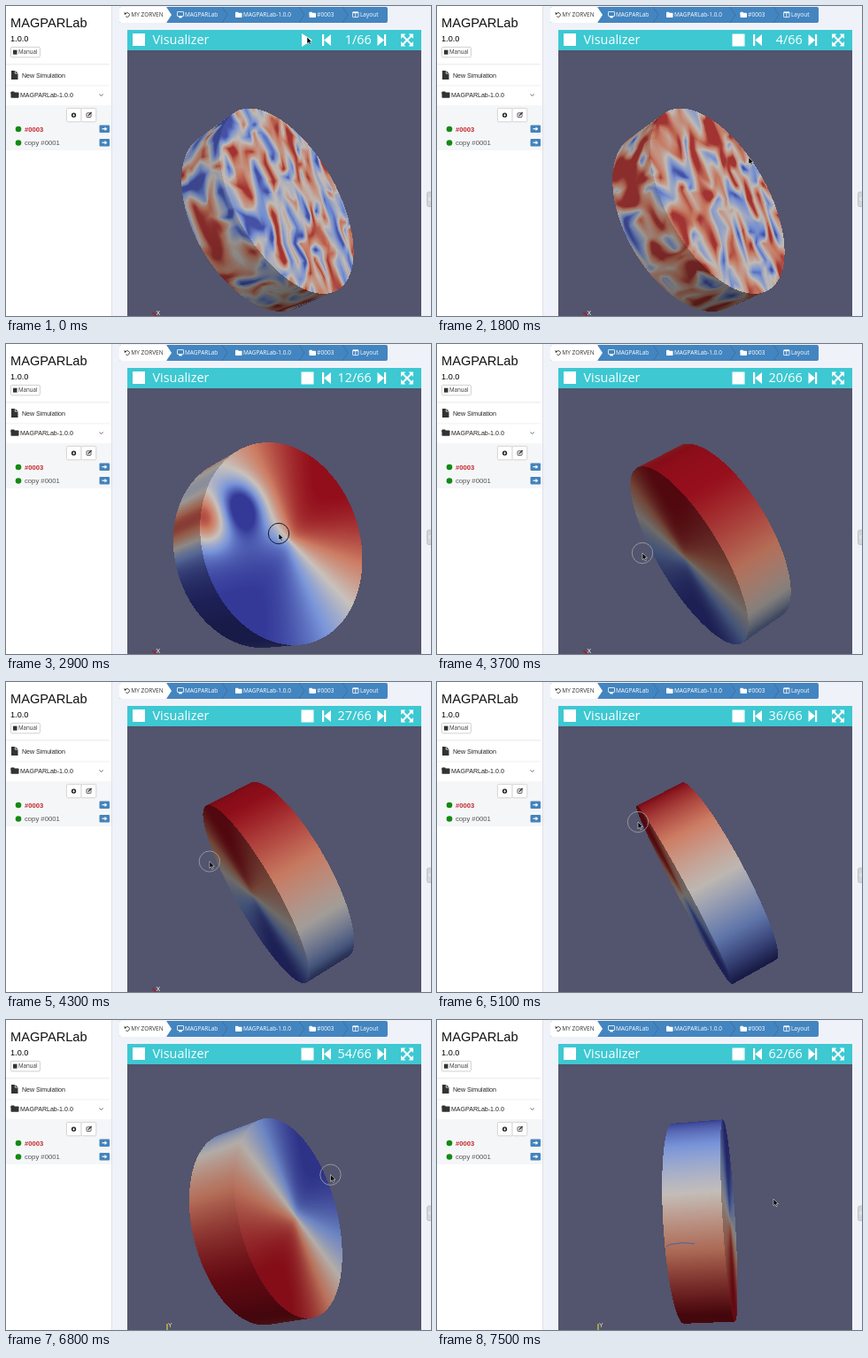
An HTML page with a canvas for the animation above (7600 ms loop, 480x350 px).

```html
<!DOCTYPE html>
<html lang="en">
<head>
<meta charset="utf-8">
<title>Visualizer</title>
<style>
html, body { margin: 0; width: 100%; height: 100%; overflow: hidden; background: #fff; }
canvas { display: block; width: 480px; height: 350px; }
</style>
</head>
<body>
<canvas id="stage" width="480" height="350"></canvas>
<script>
const ctx = document.getElementById('stage').getContext('2d');
const LOOP = 7600, STEP = 100;
const SANS = '"Liberation Sans", Arial, sans-serif';
const OPEN = '"Open Sans", "Noto Sans", sans-serif';
const BACK = [83, 84, 109];

// ---------- helpers ----------
const clamp = (v, a, b) => Math.min(b, Math.max(a, v));
const mix = (a, b, k) => a + (b - a) * k;
const dot = (a, b) => a[0] * b[0] + a[1] * b[1] + a[2] * b[2];
const cross = (a, b) => [a[1] * b[2] - a[2] * b[1], a[2] * b[0] - a[0] * b[2], a[0] * b[1] - a[1] * b[0]];

// keys: [time, value, ...] in order of time, held before the first and after the last
function track(keys, t) {
  let i = 0;
  while (i < keys.length - 2 && keys[i + 1][0] <= t) i++;
  const a = keys[i], b = keys[i + 1];
  const k = clamp((t - a[0]) / (b[0] - a[0]), 0, 1);
  return a.slice(1).map((v, j) => mix(v, b[j + 1], k));
}

function rect(x, y, w, h, fill) {
  ctx.fillStyle = fill;
  ctx.fillRect(x, y, w, h);
}

function box(x, y, w, h, r, fill, stroke) {
  ctx.beginPath();
  ctx.roundRect(x, y, w, h, r);
  if (fill) { ctx.fillStyle = fill; ctx.fill(); }
  if (stroke) { ctx.strokeStyle = stroke; ctx.lineWidth = 0.8; ctx.stroke(); }
}

function poly(points, fill) {
  ctx.beginPath();
  points.forEach(p => ctx.lineTo(...p));
  ctx.closePath();
  ctx.fillStyle = fill;
  ctx.fill();
}

function line(points, color, width) {
  ctx.beginPath();
  points.forEach(p => ctx.lineTo(...p));
  ctx.strokeStyle = color;
  ctx.lineWidth = width;
  ctx.stroke();
}

function arc(x, y, r, from, to, color, width) {
  ctx.beginPath();
  ctx.arc(x, y, r, from, to);
  ctx.strokeStyle = color;
  ctx.lineWidth = width;
  ctx.stroke();
}

// triangle with a vertical side at x and its tip w to the right (or left)
const wedge = (x, y, w, h, fill) => poly([[x, y - h], [x + w, y], [x, y + h]], fill);

function disc(x, y, r, fill) {
  ctx.beginPath();
  ctx.arc(x, y, r, 0, 7);
  ctx.fillStyle = fill;
  ctx.fill();
}

function text(s, x, y, font, fill, align = 'left') {
  ctx.font = font;
  ctx.fillStyle = fill;
  ctx.textAlign = align;
  ctx.fillText(s, x, y);
}

function folder(x, y, w, fill) {
  box(x, y + 1, w, w * 0.7, 0.8, fill);
  box(x, y, w * 0.45, 3, 0.8, fill);
}

// ---------- motion ----------
// time; yaw and pitch of the axis, turn of the field about it, in degrees
const POSE = [
  [2300, 55, 25, 86],
  [2900, 38, 11, 47],
  [3700, -67, -29, 56],
  [5100, -83.5, -28, 93],
  [6100, 0, 34, 162],
  [7100, 84, 3.4, 256]
];
const COUNT = [[1200, 1], [1800, 4], [2900, 12.1], [7500, 62.1]];
const MOUSE = [
  [1200, 340, 35], [1800, 352, 171], [2900, 308, 214], [3700, 232, 236],
  [5100, 227, 158], [6100, 335, 111], [7100, 380, 202]
];
const PLAY_AT = 1100, PRESS_AT = 2400, RELEASE_AT = 7100;

// ---------- field ----------
let seed = 11;
const rnd = () => (seed = (seed * 16807) % 2147483647) / 2147483647;
const lattice = Array.from({ length: 4096 }, () => rnd() * 2 - 1);
const node = (x, y, z) => lattice[(x * 73 + y * 1031 + z * 389) & 4095];

function noise(x, y, z) {
  const i = Math.floor(x), j = Math.floor(y), k = Math.floor(z);
  const row = (j, k) => mix(node(i, j, k), node(i + 1, j, k), x - i);
  const layer = k => mix(row(j, k), row(j + 1, k), y - j);
  return mix(layer(k), layer(k + 1), z - k);
}

const bump = (a, b, a0, b0, s) => Math.exp(-((a - a0) ** 2 + (b - b0) ** 2) / s);

// random domains that order into a vortex; a, b across the face, c along the axis, in radii
function field(a, b, c, step) {
  const order = clamp((step - 4) / 7, 0, 1);
  let v = 1.15 * a / (Math.hypot(a, b) + 0.1);
  const blob = Math.max(0, 1 - Math.abs(step - 12) / 6);
  if (blob) v += blob * (1.3 * bump(a, b, -0.5, 0.82, 0.06) - 1.2 * bump(a, b, -0.12, 0.6, 0.06));
  if (order < 1) {
    const f = 10.5 - 0.6 * Math.min(step, 6);
    const warp = 0.9 * noise(a * 6 + 60, b * 6 + 60, c * 6 + step + 60);
    const n = noise(a * 5 + warp + 40, b * f + a * 2 + warp + 40, c * 6 + step * 0.8 + 40);
    v = mix(clamp(1.5 * n + 0.09 * (step - 1), -0.85, 0.82), v, order);
  }
  return v;
}

const STOPS = [[57, 63, 168], [133, 164, 240], [221, 214, 208], [226, 138, 110], [162, 16, 30]];
const palette = Array.from({ length: 257 }, (_, i) => {
  const k = Math.min(3, i >> 6);
  return STOPS[k].map((v, j) => mix(v, STOPS[k + 1][j], i / 64 - k));
});

// ---------- cylinder, cast ray by ray ----------
const CX = 303, CY = 228, R = 112, H = 28, EYE = 640;
const VX = 174, VY = 100, VW = 260, VH = 250;
const LIGHT = [0.1, 0.54, 0.836];
const view = ctx.createImageData(VW, VH);

// axis, direction of positive field, and the third side of the frame
function frameAt(t) {
  const [yaw, pitch, turn] = track(POSE, t).map(d => d * Math.PI / 180);
  const sy = Math.sin(yaw), cy = Math.cos(yaw), sp = Math.sin(pitch), cp = Math.cos(pitch);
  const n = [sy * cp, sp, cy * cp];
  const right = [cy, 0, -sy], up = [-sy * sp, cp, -cy * sp];
  const g = right.map((v, i) => v * Math.cos(turn) + up[i] * Math.sin(turn));
  return [n, g, cross(n, g)];
}

function drawCylinder(t, step) {
  const [n, g, m] = frameAt(t);
  const eyeN = EYE * n[2], lightN = dot(n, LIGHT);
  const cap = eyeN > H ? 1 : eyeN < -H ? -1 : 0;
  const C = EYE * EYE - eyeN * eyeN - R * R;
  const data = view.data;

  for (let j = 0, o = 0; j < VH; j++) {
    for (let i = 0; i < VW; i++, o += 4) {
      const dx = VX + i + 0.5 - CX, dy = CY - VY - j - 0.5;
      const dn = dx * n[0] + dy * n[1] - EYE * n[2];
      let s = 0, side = false;
      if (cap) {
        const q = (cap * H - eyeN) / dn;
        const d2 = (q * dx) ** 2 + (q * dy) ** 2 + (EYE - q * EYE) ** 2;
        if (d2 - H * H <= R * R) s = q;
      }
      if (!s) {
        const A = dx * dx + dy * dy + EYE * EYE - dn * dn;
        const B = -EYE * EYE - eyeN * dn;
        const D = B * B - A * C;
        if (D > 0) {
          const q = (-B - Math.sqrt(D)) / A;
          if (Math.abs(eyeN + q * dn) <= H) { s = q; side = true; }
        }
      }
      let rgb = BACK, shade = 1;
      if (s) {
        const p = [s * dx, s * dy, EYE - s * EYE];
        const c = dot(p, n);
        const facing = side ? (dot(p, LIGHT) - c * lightN) / R : cap * lightN;
        shade = (side ? 0.42 : 0.5) + 0.5 * Math.max(0, facing);
        const v = field(dot(p, g) / R, dot(p, m) / R, c / R, step);
        rgb = palette[Math.round(128 + 128 * clamp(v, -1, 1))];
      }
      for (let k = 0; k < 3; k++) data[o + k] = rgb[k] * shade;
      data[o + 3] = 255;
    }
  }
  ctx.putImageData(view, VX, VY);
}

// ---------- page ----------
function drawRun(y, label, font, color) {
  disc(14, y, 3.3, '#138a13');
  text(label, 21, y + 2.8, font + SANS, color);
  box(105.5, y - 4.5, 11.5, 8.5, 1, '#4483bb');
  rect(108.5, y - 0.9, 4, 1.2, '#fff');
  wedge(111.5, y - 0.3, 2.8, 2.2, '#fff');
}

function drawSidebar() {
  rect(0, 0, 120, 350, '#fff');
  text('MAGPARLab', 5, 23.8, '14.6px ' + SANS, '#111');
  text('1.0.0', 5, 39.5, '9.2px ' + SANS, '#000');
  box(5.4, 46.4, 33, 11.5, 1.5, '#fff', '#c4c4c4');
  rect(8, 49.7, 4.5, 5, '#333');
  text('Manual', 14, 54.4, '6.2px ' + OPEN, '#333');
  rect(0, 65.5, 117, 0.8, '#e2e2e2');
  poly([[6, 73], [10.5, 73], [13.5, 76], [13.5, 83], [6, 83]], '#333');
  line([[10.3, 73], [10.3, 76.2], [13.5, 76.2]], '#fff', 0.7);
  text('New Simulation', 18, 80.8, '7.05px ' + SANS, '#222');
  rect(0, 89.5, 117, 0.8, '#eee');
  folder(5.5, 96.5, 9, '#333');
  text('MAGPARLab-1.0.0', 16, 103.2, '7.05px ' + SANS, '#222');
  line([[105.5, 99.5], [107.5, 101.5], [109.5, 99.5]], '#555', 0.9);

  rect(0, 112, 119, 51, '#f5f6f8');
  [68.4, 85].forEach(x => box(x, 115.4, 16.8, 15.4, 1.5, '#fff', '#ccc'));
  disc(76.5, 123.2, 2.6, '#222');
  rect(75, 122.8, 3, 0.8, '#fff');
  rect(76.1, 121.7, 0.8, 3, '#fff');
  box(91, 120.8, 5, 4.8, 0.8, null, '#333');
  line([[92.7, 124], [96.6, 120]], '#333', 1.2);
  drawRun(139, '#0003', 'bold 7.6px ', '#c4282d');
  drawRun(154.5, 'copy #0001', '7.7px ', '#555');
  rect(119, 0, 1, 350, '#dfe1e8');
}

function drawTrail() {
  const font = '6.5px ' + OPEN;
  rect(120, 0, 360, 350, '#f0f2f9');
  box(128, 1, 303, 18, 2, '#4385c0');
  box(128, 1, 54, 18, 2, '#fff');
  wedge(181, 10, 6, 9, '#fff');
  [244, 331, 380].forEach(x => line([[x, 1], [x + 6, 10], [x, 19]], '#3973a8', 1));
  arc(137, 10, 2.4, -2.6, 2.4, '#333', 0.9);
  poly([[133.5, 7], [133.9, 9.9], [136.4, 8.8]], '#333');
  box(193.5, 6.5, 7, 5, 0.5, null, '#fff');
  rect(195.2, 12, 3.6, 1.4, '#fff');
  folder(259, 6.8, 7.5, '#fff');
  folder(342.5, 6.8, 7.5, '#fff');
  box(391.6, 7, 6.4, 5.6, 0.5, null, '#fff');
  rect(391.6, 6.6, 6.4, 1.5, '#fff');
  rect(394.4, 7, 0.8, 5.6, '#fff');
  text('MY ZORVEN', 141.3, 12.4, font, '#333');
  text('MAGPARLab', 202, 12.4, font, '#fff');
  text('MAGPARLab-1.0.0', 268, 12.4, font, '#fff');
  text('#0003', 351.3, 12.4, font, '#fff');
  text('Layout', 400, 12.4, font, '#fff');
  box(475.5, 210, 8, 16.5, 2, '#d4d5da', '#bbb');
  line([[479.3, 216], [477.6, 218], [479.3, 220]], '#fff', 0.8);
}

function drawHeader(t, step) {
  rect(137, 27, 332, 23, '#3dc8d2');
  rect(143, 31, 14, 14, '#fff');
  text('Visualizer', 165.5, 43, '14.4px ' + OPEN, '#fff');
  if (t < PLAY_AT) wedge(334, 38.5, 12, 7.5, '#fff');
  else rect(333.5, 31.5, 14, 14, '#fff');
  rect(357, 32, 2.2, 13, '#fff');
  wedge(367, 38.5, -7.8, 6.5, '#fff');
  text(step + '/66', 412.7, 43, '14.4px ' + OPEN, '#fff', 'right');
  wedge(419.5, 38.5, 7.5, 6.5, '#fff');
  rect(427, 32, 2.2, 13, '#fff');
  for (const sx of [-1, 1]) {
    for (const sy of [-1, 1]) {
      const x = 453 + 7 * sx, y = 38.5 + 7 * sy;
      poly([[x, y], [x - 5.4 * sx, y], [x, y - 5.4 * sy]], '#fff');
      line([[453, 38.5], [x - 2 * sx, y - 2 * sy]], '#fff', 2);
    }
  }
}

function drawAxes(t) {
  const font = '7px ' + SANS;
  if (t < 4400) {
    line([[165.5, 346], [170, 350]], '#b01818', 1.6);
    text('X', 169.5, 349, font, '#fff');
  } else if (t > 5500 && t < 6600) {
    text('Z', 184, 352, font, '#e6e6d0');
  } else if (t >= 6600) {
    line([[182, 343], [182, 350]], '#c9c43c', 1.4);
    text('Y', 183, 346.5, font, '#e6e6d0');
  }
  if (t >= RELEASE_AT) line([[259, 256], [263, 253.5], [277, 251.5], [291, 252.5]], '#4a62a0', 1);
}

function drawMouse(t) {
  const [x, y] = track(MOUSE, t);
  if (t >= PRESS_AT && t < RELEASE_AT) {
    arc(x, y, 11.7, 0, 7, t < 3100 ? '#16182a' : 'rgba(165,165,168,0.8)', 1);
  }
  ctx.save();
  ctx.translate(x, y);
  const arrow = [[0, 0], [0, 7.6], [1.8, 6], [3, 8.8], [4.3, 8.2], [3.1, 5.6], [5.5, 5.4]];
  poly(arrow, '#000');
  line([...arrow, arrow[0]], 'rgba(255,255,255,0.85)', 0.6);
  ctx.restore();
}

function draw(t) {
  const step = Math.floor(track(COUNT, t)[0] + 1e-6);
  drawTrail();
  drawSidebar();
  rect(137, 50, 332, 300, `rgb(${BACK})`);
  drawCylinder(t, step);
  drawHeader(t, step);
  drawAxes(t);
  drawMouse(t);
}

const start = performance.now();
let last = -1;
function tick() {
  const now = Math.max(0, performance.now() - start) % LOOP;
  const t = Math.floor(now / STEP) * STEP;
  if (t !== last) draw(last = t);
  requestAnimationFrame(tick);
}
tick();
</script>
</body>
</html>
```
